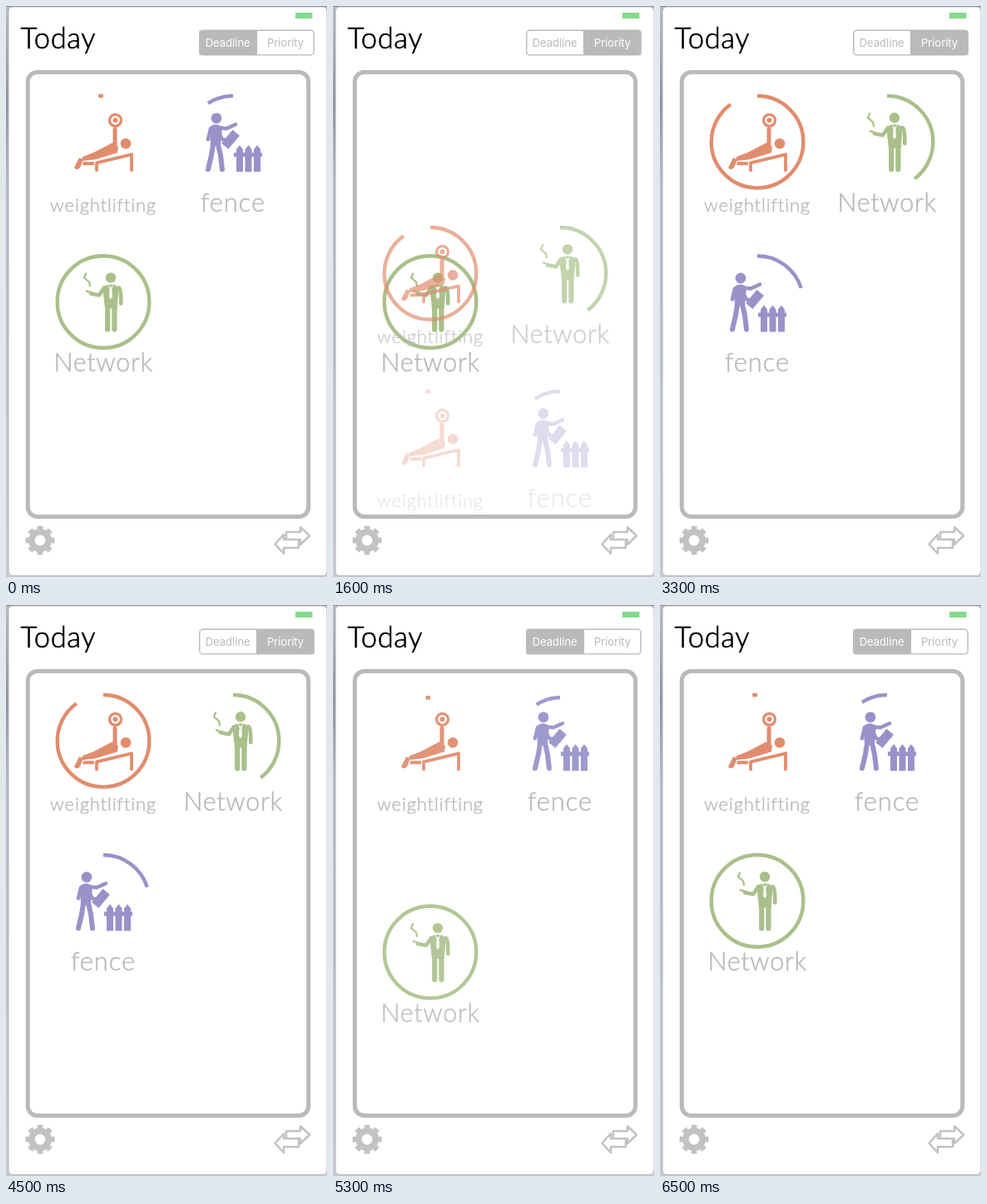
These frames come from a looping animation (386x686 px, 6600 ms). An HTML page:

```html
<!DOCTYPE html>
<html lang="en">
<head>
<meta charset="utf-8">
<title>Today</title>
<style>
html, body { margin: 0; width: 100%; height: 100%; overflow: hidden; background: #fff; }
svg { display: block; width: 386px; height: 686px; }
text { font-family: Lato, "Open Sans", sans-serif; }
.title { font-weight: 300; font-size: 34.5px; letter-spacing: .6px; stroke: #000; stroke-width: .6; }
.tab { font: 13px Inter, Roboto, sans-serif; text-anchor: middle; }
.label { font-weight: 300; fill: #b9b9b9; stroke: #b9b9b9; stroke-width: .5; text-anchor: middle; }
.line { fill: none; stroke: #bababa; }
.tool { fill: none; stroke: #c2c2c2; }
.limb { fill: none; stroke: currentColor; stroke-linecap: round; stroke-linejoin: round; }
.icon { fill: currentColor; }
</style>
</head>
<body>
<svg viewBox="0 0 386 686">
  <defs>
    <linearGradient id="edge" x2="0" y2="1">
      <stop offset="0" stop-color="#b9bcc6"/>
      <stop offset=".17" stop-color="#8e93a5"/>
      <stop offset=".3" stop-color="#b4b8cc"/>
      <stop offset="1" stop-color="#c9cad2"/>
    </linearGradient>
    <clipPath id="panel"><rect x="29" y="82" width="332" height="529"/></clipPath>
    <clipPath id="labelBox"><rect x="-80" y="50" width="160" height="37.5"/></clipPath>

    <g id="lifter">
      <circle class="limb" cx="14.5" cy="-26" r="7" stroke-width="3.2"/>
      <circle cx="14.5" cy="-26" r="3"/>
      <circle cx="27" cy="2" r="6.3"/>
      <path class="limb" stroke-width="5" d="M14-15L14 6"/>
      <path d="M11 1L18 6L17 13L-9 21L-26 23L-25 18L-12 13Z"/>
      <path d="M-24 24H-11V28H-25ZM-29 19L-24 21L-28 31Q-32 35-35 31Z"/>
      <path class="limb" stroke-width="3.8" d="M-8 34V25L34 15V34"/>
    </g>

    <g id="builder">
      <circle cx="-20" cy="-28.5" r="6.4"/>
      <path d="M-28-18Q-21-24-13-18L-15 5H-27Z"/>
      <path class="limb" stroke-width="6" d="M-24 3L-26 16L-30 33M-18 3L-15 16L-13 33"/>
      <path class="limb" stroke-width="4.5" d="M-17-17L-8-16L3-21M-27-16L-30-3"/>
      <rect x="-6" y="-11" width="12" height="22" rx="1" stroke="#fff" transform="translate(-3 -3) rotate(40)"/>
      <path class="limb" stroke-width="4" d="M-17-12L-13-3L-6-2"/>
      <path d="M1 13H35V18H1Z"/>
      <path d="M4 36V9L8 4L12 9V36ZM14.5 36V9L18.5 4L22.5 9V36ZM25 36V9L29 4L33 9V36Z"/>
    </g>

    <g id="suit">
      <circle cx="9" cy="-29" r="6.2"/>
      <path d="M-1-18Q9-24 19-18L16.5 8H2Z"/>
      <path class="limb" stroke-width="6.2" d="M5.2 5V33M13.4 5V33"/>
      <path class="limb" stroke-width="4.6" d="M19-17Q21.5-15 21.3 2M1-17L-5-8L-15-10"/>
      <path class="limb" stroke-width="2.4" d="M-20-13L-14-11"/>
      <path class="limb" stroke-width="2.2" d="M-21-34L-23-29L-17-24L-16-19"/>
      <path fill="#fff" d="M6-20.5L9-17L12-20.5L10.3-15L11-6L9-3L7-6L7.7-15Z"/>
    </g>
  </defs>

  <rect width="386" height="686" fill="url(#edge)"/>
  <path d="M0 .5H386" stroke="#8b8b8f"/>
  <rect x="3" y="1" width="383" height="683.5" rx="5" fill="#fff" stroke="#a9a9ae" stroke-width=".8"/>
  <rect x="348" y="8" width="20.5" height="7" fill="#86d98a"/>
  <text class="title" x="17.5" y="51">Today</text>

  <rect id="tabFill" y="29.5" width="69" height="29.5" fill="#bababa"/>
  <rect class="line" x="232.8" y="29.3" width="137.4" height="29.6" rx="4" stroke-width="1.4"/>
  <path class="line" d="M301.5 29V59" stroke-width="1.2"/>
  <text class="tab" x="266.7" y="49">Deadline</text>
  <text class="tab" x="336" y="49">Priority</text>

  <g id="stage" clip-path="url(#panel)"></g>
  <rect class="line" x="26.2" y="79.5" width="337.5" height="534" rx="11.5" stroke-width="5"/>

  <g class="tool" transform="translate(41 642)">
    <circle r="10.2" stroke-width="7.6"/>
    <circle r="15" stroke-width="5" pathLength="80" stroke-dasharray="5.6 4.4" stroke-dashoffset="2.8"/>
  </g>
  <path class="tool" stroke-width="2.5" stroke-linejoin="round"
    d="M337 641V632H354V626L365 636.5L354 647V641H334V635L323.5 646.5L334 658V651H352V641"/>
</svg>
<script>
const LOOP = 6600, STEP = 100, TO_PRIORITY = 1357, TO_DEADLINE = 4700;
const SLIDE = 400, ROW_DELAY = 298, TRAVEL = 513, RADIUS = 55.3;
const stage = document.getElementById("stage");
const tabFill = document.getElementById("tabFill");
const tabs = document.querySelectorAll(".tab");

const kinds = {
  lifter: { color: "#e18c6d", label: "weightlifting", size: 22, spacing: 0.85 },
  builder: { color: "#9892c9", label: "fence", size: 31, spacing: 0.9 },
  suit: { color: "#a9c08a", label: "Network", size: 30.5, spacing: 0.7 }
};

// Arcs run clockwise from the top: start angle and sweep in degrees.
function makeItem(name, slot, start, sweep) {
  const { color, label, size, spacing } = kinds[name];
  const g = document.createElementNS("http://www.w3.org/2000/svg", "g");
  g.innerHTML = `
    <g class="icon" color="${color}">
      <circle class="ring" fill="none" stroke="${color}" stroke-width="4.4" pathLength="360"
        stroke-dasharray="${sweep} ${360 - sweep}" transform="rotate(${start - 90})"/>
      <use href="#${name}"/>
    </g>
    <g clip-path="url(#labelBox)">
      <text class="label" y="83.5" font-size="${size}" letter-spacing="${spacing}">${label}</text>
    </g>`;
  stage.append(g);
  return {
    g, row: slot >> 1, x: 117 + 156 * (slot % 2), y: 163.3 + 192.2 * (slot >> 1),
    ring: g.querySelector(".ring"), icon: g.querySelector(".icon")
  };
}

const lists = [
  [makeItem("lifter", 0, -6, 6), makeItem("builder", 1, -33, 33), makeItem("suit", 2, 0, 360)],
  [makeItem("lifter", 0, 0, 324.5), makeItem("suit", 1, 0, 143), makeItem("builder", 2, 0, 72.5)]
];

function ease(x) {
  x = Math.min(1, Math.max(0, x));
  return x < 0.5 ? 2 * x * x : 1 - 2 * (1 - x) ** 2;
}

function place(item, since, incoming) {
  const p = ease((since - item.row * ROW_DELAY) / SLIDE);
  const shown = incoming ? p : 1 - p;
  // Rings dip inward once their row has landed.
  const pulsing = incoming && p === 1 && since > 500 && since < 1000;
  const dip = pulsing ? Math.sin(Math.PI * (since - 500) / 500) : 0;
  item.g.setAttribute("transform", `translate(${item.x} ${item.y + TRAVEL * (1 - shown)})`);
  item.g.setAttribute("opacity", shown);
  item.icon.setAttribute("opacity", 1 - 0.13 * dip);
  item.ring.setAttribute("r", RADIUS * (1 - 0.1 * dip));
}

function draw(now) {
  const t = Math.floor(now % LOOP / STEP) * STEP;
  const mode = t >= TO_PRIORITY && t < TO_DEADLINE ? 1 : 0;
  const since = mode ? t - TO_PRIORITY : (t - TO_DEADLINE + LOOP) % LOOP;
  lists.forEach((list, i) => list.forEach(item => place(item, since, i === mode)));
  tabFill.setAttribute("x", mode ? 301.5 : 232.5);
  tabs.forEach((tab, i) => tab.setAttribute("fill", i === mode ? "#fff" : "#bababa"));
}

let begin;
function tick(now) {
  begin ??= now;
  draw(now - begin);
  requestAnimationFrame(tick);
}
draw(0);
requestAnimationFrame(tick);
</script>
</body>
</html>
```
